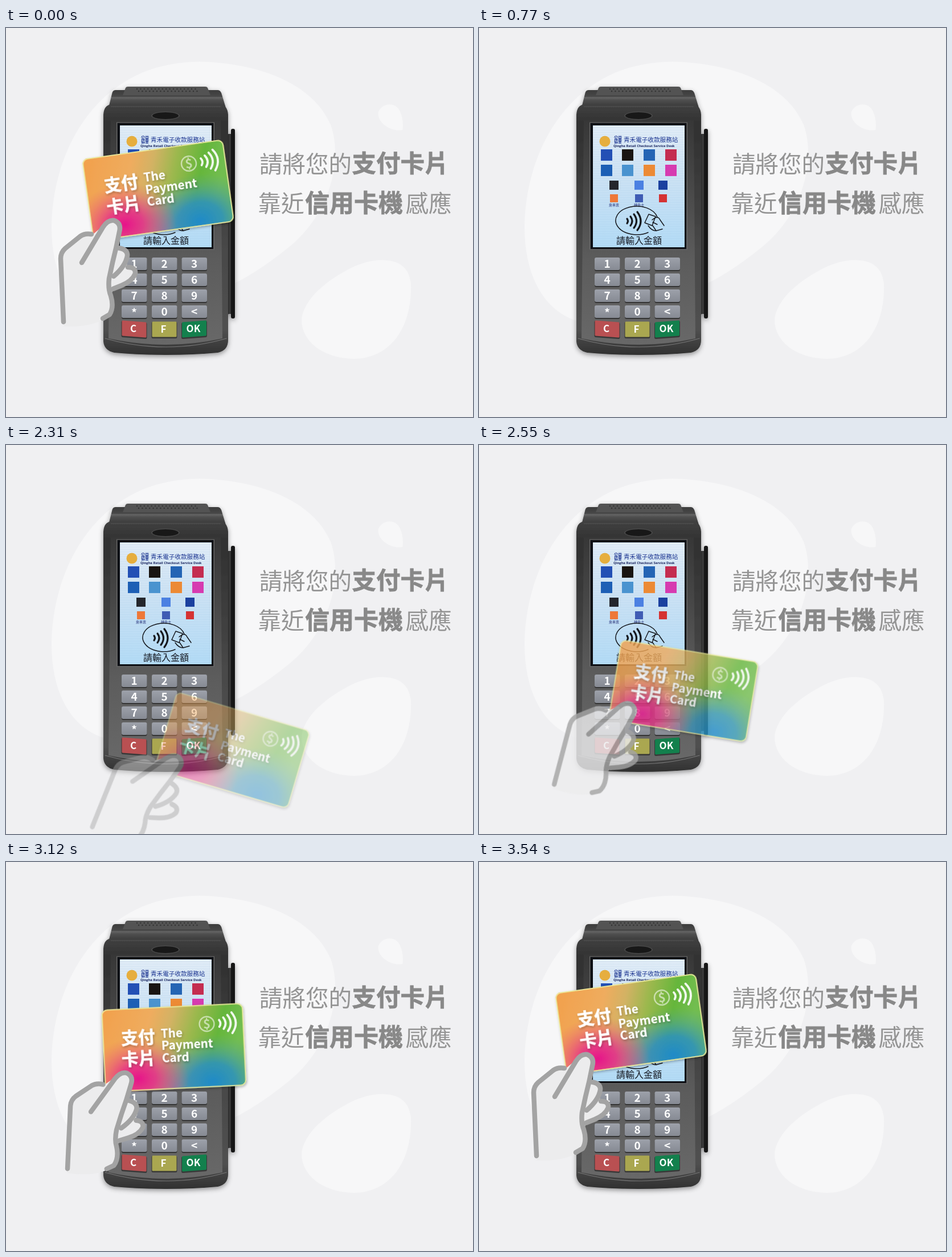
These frames come from a looping animation (820 by 683 pixels, 6580 ms). An HTML page:

```html
<!DOCTYPE html>
<html lang="zh-Hant">
<head>
<meta charset="utf-8">
<title>感應支付</title>
<style>
html, body { margin: 0; width: 100%; height: 100%; overflow: hidden; background: #f0f0f2; }
svg { display: block; width: 100%; height: 100%; }
text { font-family: "Noto Sans CJK TC", "Noto Sans CJK JP", "Noto Sans CJK", sans-serif; }
.latin { font-family: "Open Sans", "Noto Sans", sans-serif; }
.b { font-weight: 700; }
.heavy { font-weight: 900; fill: #888; stroke: #888; stroke-width: .8; }
.line { fill: none; stroke-linecap: round; stroke-linejoin: round; }
</style>
</head>
<body>
<svg viewBox="0 0 820 683" preserveAspectRatio="none">
  <defs>
    <linearGradient id="cover" x2="0" y2="1">
      <stop stop-color="#3d3d3d"/><stop offset=".36" stop-color="#474747"/><stop offset=".42" stop-color="#656565"/>
      <stop offset=".55" stop-color="#505050"/><stop offset="1" stop-color="#353535"/>
    </linearGradient>
    <linearGradient id="body" x2="0" y2="1">
      <stop stop-color="#414141"/><stop offset=".08" stop-color="#303030"/>
      <stop offset=".6" stop-color="#494949"/><stop offset=".9" stop-color="#505050"/><stop offset="1" stop-color="#303030"/>
    </linearGradient>
    <linearGradient id="face" x2="0" y2="1">
      <stop stop-color="#373737"/><stop offset=".3" stop-color="#484848"/>
      <stop offset=".62" stop-color="#5c5c5c"/><stop offset="1" stop-color="#686868"/>
    </linearGradient>
    <linearGradient id="lcd" x2="0" y2="1">
      <stop stop-color="#e6eff8"/><stop offset=".45" stop-color="#cfe4f5"/><stop offset="1" stop-color="#b5ddf7"/>
    </linearGradient>
    <linearGradient id="key" x2="0" y2="1"><stop stop-color="#9da1aa"/><stop offset="1" stop-color="#868a93"/></linearGradient>
    <linearGradient id="base" x2="1" y2=".2">
      <stop stop-color="#f2a04c"/><stop offset=".35" stop-color="#efac5e"/><stop offset=".5" stop-color="#d3b264"/>
      <stop offset=".66" stop-color="#9cb84e"/><stop offset=".85" stop-color="#65b63b"/><stop offset="1" stop-color="#72bd50"/>
    </linearGradient>
    <radialGradient id="pink"><stop stop-color="#e6148a"/><stop offset=".35" stop-color="#e52d88" stop-opacity=".85"/><stop offset="1" stop-color="#ea6a70" stop-opacity="0"/></radialGradient>
    <radialGradient id="violet"><stop stop-color="#9a6cb4" stop-opacity=".85"/><stop offset="1" stop-color="#b58a9a" stop-opacity="0"/></radialGradient>
    <radialGradient id="blue"><stop stop-color="#1f8ac8"/><stop offset=".4" stop-color="#2b90c0" stop-opacity=".85"/><stop offset="1" stop-color="#5aa890" stop-opacity="0"/></radialGradient>
    <pattern id="scan" width="4" height="3" patternUnits="userSpaceOnUse"><path d="M0 .5H4" stroke="#8fb9dc" stroke-opacity=".28"/></pattern>
    <filter id="soft" x="-20%" y="-20%" width="140%" height="140%"><feDropShadow dx="0" dy="3" stdDeviation="4" flood-opacity=".4"/></filter>
    <filter id="lift" x="-20%" y="-20%" width="140%" height="140%"><feDropShadow dx="1" dy="2" stdDeviation="2" flood-opacity=".3"/></filter>
    <clipPath id="cardClip"><rect x="-125" y="-73" width="250" height="146" rx="10"/></clipPath>
  </defs>

  <rect width="820" height="683" fill="#f0f0f2"/>
  <g fill="#f7f7f8">
    <path d="M340 59C450 62 540 100 570 170C592 230 570 330 490 390C440 430 400 450 390 453C300 500 220 530 165 512C110 490 80 430 80 350C80 260 120 130 240 78C270 66 300 60 340 59Z"/>
    <path d="M654 147C660 133 680 129 690 143C697 155 698 172 696 179C675 183 650 165 654 147Z"/>
    <path d="M650 408C690 405 708 420 711 450C713 520 680 580 610 581C555 579 519 550 519 512C522 480 555 450 590 430C610 418 630 410 650 408Z"/>
  </g>

  <g id="terminal">
    <g filter="url(#soft)">
      <rect x="389" y="186" width="9" height="316" fill="#383838"/>
      <rect x="395" y="177" width="7" height="333" rx="3" fill="#141414"/>
      <path d="M389 187V503" stroke="#1e1e1e" stroke-width="3"/>
      <path d="M192 109H372Q377 109 379 117L386 140H180L186 116Q187 109 192 109Z" fill="url(#cover)"/>
      <path d="M205 118L210 105Q211 103 214 103H350Q353 103 354 105L359 118Z" fill="#525252"/>
      <path d="M184 134H376Q389 136 390 152V548Q390 566 372 570Q330 574 281 574Q232 574 190 570Q172 566 171 550V152Q172 136 184 134Z" fill="url(#body)"/>
    </g>
    <g id="dots" fill="#343434"/>
    <path d="M184 138H377" stroke="#555" stroke-width="1"/>
    <path d="M184 162H377L380 545Q330 556 281 556Q232 556 180 545Z" fill="url(#face)"/>
    <path d="M174 545Q226 560 281 560Q336 560 387 545" class="line" stroke="#777" stroke-width="1.2"/>
    <ellipse cx="280" cy="154" rx="25" ry="7.500" fill="#484848"/>
    <ellipse cx="280" cy="154" rx="23" ry="6" fill="#181818"/>
    <rect x="194.500" y="166" width="171" height="223" fill="none" stroke="#686868"/>
    <rect x="196" y="167" width="168" height="221" fill="#0d0f14"/>
    <rect x="200" y="171" width="161" height="214" fill="url(#lcd)"/>
    <rect x="200" y="171" width="161" height="214" fill="url(#scan)"/>
    <circle cx="221" cy="199" r="9.500" fill="#e6ae3e"/>
    <g fill="#1b3490" class="b">
      <text x="237" y="195" font-size="7">公益</text>
      <text x="237" y="202" font-size="7">協會</text>
      <text x="254" y="200" font-size="10.600" font-weight="400">青禾電子收款服務站</text>
      <text x="236" y="208.500" font-size="5.900" class="latin b" fill="#14205c">Qinghe Retail Checkout Service Desk</text>
    </g>
    <g id="brands"/>
    <g font-size="6" text-anchor="middle" fill="#25307a">
      <text x="237" y="313">乘車票</text><text x="281" y="313">轉乘卡</text>
    </g>
    <g class="line" stroke="#15171c">
      <path d="M297 359A37 25 0 1 1 313 332" stroke-width="1.500"/>
      <g id="tapWaves" stroke-width="3.200"/>
      <path d="M291 342L298 327L310 331L304 347ZM305 347L311 356L322 353M304 337Q314 328 318 337L325 347M305 341L313 345M297 347Q303 356 311 356" stroke-width="1.500"/>
    </g>
    <text x="281" y="378.500" font-size="16" text-anchor="middle" fill="#151922">請輸入金額</text>
    <g id="keys" text-anchor="middle" class="b" fill="#fff"/>
  </g>

  <g id="title" fill="#949494" font-size="40.500">
    <text x="445" y="254" font-weight="300">請將您的</text>
    <text x="607.500" y="253" font-size="42.500" class="heavy">支付卡片</text>
    <text x="442.500" y="322.500" font-weight="300">靠近</text>
    <text x="525" y="322.500" font-size="43" class="heavy">信用卡機</text>
    <text x="701.500" y="322.500" font-weight="300">感應</text>
  </g>

  <g id="card">
    <g filter="url(#lift)">
      <g clip-path="url(#cardClip)">
        <rect x="-125" y="-73" width="250" height="146" fill="url(#base)"/>
        <ellipse cx="0" cy="70" rx="75" ry="70" fill="url(#violet)"/>
        <ellipse cx="66" cy="64" rx="100" ry="84" fill="url(#blue)"/>
        <ellipse cx="-66" cy="52" rx="90" ry="74" fill="url(#pink)"/>
      </g>
      <rect x="-124.200" y="-72.200" width="248.400" height="144.400" rx="9.500" fill="none" stroke="#ecec9c" stroke-width="1.800"/>
    </g>
    <g fill="#fff" class="b" filter="url(#lift)">
      <g font-size="30" stroke="#fff" stroke-width=".6"><text x="-92.500" y="-10.500">支付</text><text x="-93.500" y="27.500">卡片</text></g>
      <g font-size="20.800"><text x="-22" y="-18.500">The</text><text x="-22" y="3.500">Payment</text><text x="-22" y="25">Card</text></g>
    </g>
    <g opacity=".55">
      <circle cx="60" cy="-39" r="13" fill="none" stroke="#fff" stroke-width="2.500"/>
      <text x="60" y="-31" font-size="22" text-anchor="middle" class="b" fill="#fff">$</text>
    </g>
    <g id="cardWaves" class="line" stroke="#fff" stroke-opacity=".9" stroke-width="3.800"/>
    <g id="hand">
      <path d="M101 520L96 405Q97 394 105 387L131 366Q138 360 153 362L172 346Q180 336 190 338Q203 343 199 358L196 386Q214 388 213 400L212 420Q228 420 227 431Q222 446 188 459L184 470Q190 490 182 503Q160 526 101 524Z" fill="#ececed"/>
      <g class="line" stroke="#a3a3a3" stroke-width="8.500">
        <path d="M196 386Q214 388 213 400Q210 418 189 436"/>
        <path d="M214 420Q228 420 227 431Q222 444 203 452L188 458"/>
        <path d="M101 516L96 405Q96 394 104 387L130 366Q138 360 150 362"/>
        <path d="M133 412L170 350Q179 336 190 338Q203 343 199 358Q194 385 187 412L181 440Q179 458 184 470Q190 490 182 503L170 510"/>
      </g>
    </g>
  </g>
</svg>
<script>
const LOOP = 6580, STEP = 30;
const $ = id => document.getElementById(id);

function add(parent, tag, attrs, label) {
  const el = document.createElementNS('http://www.w3.org/2000/svg', tag);
  for (const name in attrs) el.setAttribute(name, attrs[name]);
  if (label) el.textContent = label;
  return parent.appendChild(el);
}

function drawDots() {
  for (let row = 0; row < 2; row++)
    for (let i = 0; i < 17; i++)
      add($('dots'), 'circle', { cx: 230 + i * 6.4 + row * 3, cy: 107 + row * 4, r: 1.2 });
}

function drawBrands() {
  const rows = [
    [223, 20, [224, 261, 299, 337], ['#2350b5', '#191512', '#2464b4', '#c42c50']],
    [250, 20, [224, 261, 299, 337], ['#1d5fb5', '#4a93cf', '#ec8a35', '#d63bb0']],
    [276, 16, [237, 281, 323], ['#24262c', '#4b80e2', '#1b409f']],
    [299, 14, [237, 281, 323], ['#ee7838', '#3f5cb4', '#d53232']]
  ];
  for (const [y, size, xs, colors] of rows)
    xs.forEach((x, i) => add($('brands'), 'rect',
      { x: x - size / 2, y: y - size / 2, width: size, height: size, fill: colors[i] }));
}

function drawKeys() {
  const keys = $('keys'), cols = [203, 256, 308.5];
  [...'123456789*0<'].forEach((label, i) => {
    const x = cols[i % 3], y = 403 + 28 * Math.floor(i / 3);
    add(keys, 'rect', { x, y: y + 1.5, width: 44.5, height: 22.5, rx: 3, fill: '#343434' });
    add(keys, 'rect', { x, y, width: 44.5, height: 22, rx: 3, fill: 'url(#key)' });
    add(keys, 'text', { x: x + 22, y: y + (label === '*' ? 20 : 18), 'font-size': 19 }, label);
  });
  [['C', '#b95052', 515, 518], ['F', '#aaa750', 517, 517], ['OK', '#13804d', 518, 515]].forEach(([label, fill, l, r], i) => {
    const x = cols[i];
    const shape = `M${x + 2} ${l}L${x + 42} ${r}L${x + 42} ${r + 24}L${x + 2} ${l + 24}Z`;
    const join = { d: shape, 'stroke-width': 5, 'stroke-linejoin': 'round' };
    add(keys, 'path', { ...join, fill: '#383838', stroke: '#383838', transform: 'translate(0 1.5)' });
    add(keys, 'path', { ...join, fill, stroke: fill, 'stroke-width': 3 });
    add(keys, 'text', { x: x + 20.5, y: label === 'F' ? 535 : 533.5, 'font-size': 17 }, label);
  });
}

function drawWaves(parent, x, y, gap, half, grow) {
  for (let i = 0; i < 4; i++) {
    const h = half + grow * i, cx = x + gap * i;
    add(parent, 'path', { d: `M${cx} ${y - h}Q${cx + h * 0.75} ${y} ${cx} ${y + h}` });
  }
}

const easeOut = u => 1 - Math.pow(1 - u, 1.5);
const mix = (a, b, k) => a.map((v, i) => v + (b[i] - v) * k);

// Poses: card x, y, angle, scale, then hand shift x, y
const ENTER = [467, 727, 29.5, 0.98, -5, -3];
const HOVER = [350, 407, 7.6, 0.98, -5, -3];
const REST = [267, 285, -8, 1, 0, 0];

function poseAt(t) {
  if (t >= 3540 || t < 30) return REST;
  return t < 2670 ? mix(ENTER, HOVER, easeOut(Math.max(0, t - 2010) / 660))
                  : mix(HOVER, REST, easeOut((t - 2670) / 870));
}

function place(el, opacity, transform) {
  el.style.display = opacity > 0 ? '' : 'none';
  el.setAttribute('opacity', opacity);
  el.setAttribute('transform', transform);
}

function render(time) {
  const snap = start => start + Math.floor((time - start) / STEP) * STEP;

  const c = time >= 2040 ? snap(2040) : time;
  const cardAlpha = c < 30 ? 1 : c < 2040 ? 0 : Math.min(1, (c - 2010) / 660);
  const [x, y, angle, scale, hx, hy] = poseAt(c);
  place($('card'), cardAlpha, `translate(${x} ${y}) rotate(${angle}) scale(${scale})`);
  place($('hand'), 1, `translate(${hx} ${hy}) rotate(${-REST[2]}) translate(${-REST[0]} ${-REST[1]})`);

  const u = time < 30 ? 1 : time < 200 ? 0 : Math.min(1, (snap(200) - 170) / 600);
  const away = 1 - easeOut(u);
  place($('title'), u, `translate(${-330 * away} ${116 * away})`);
}

drawDots();
drawBrands();
drawKeys();
drawWaves($('tapWaves'), 260, 339, 6, 4, 4);
drawWaves($('cardWaves'), 82, -39, 7.5, 6, 4.1);

const began = performance.now();
function tick() {
  render((performance.now() - began) % LOOP);
  requestAnimationFrame(tick);
}
render(0);
requestAnimationFrame(tick);
</script>
</body>
</html>
```
